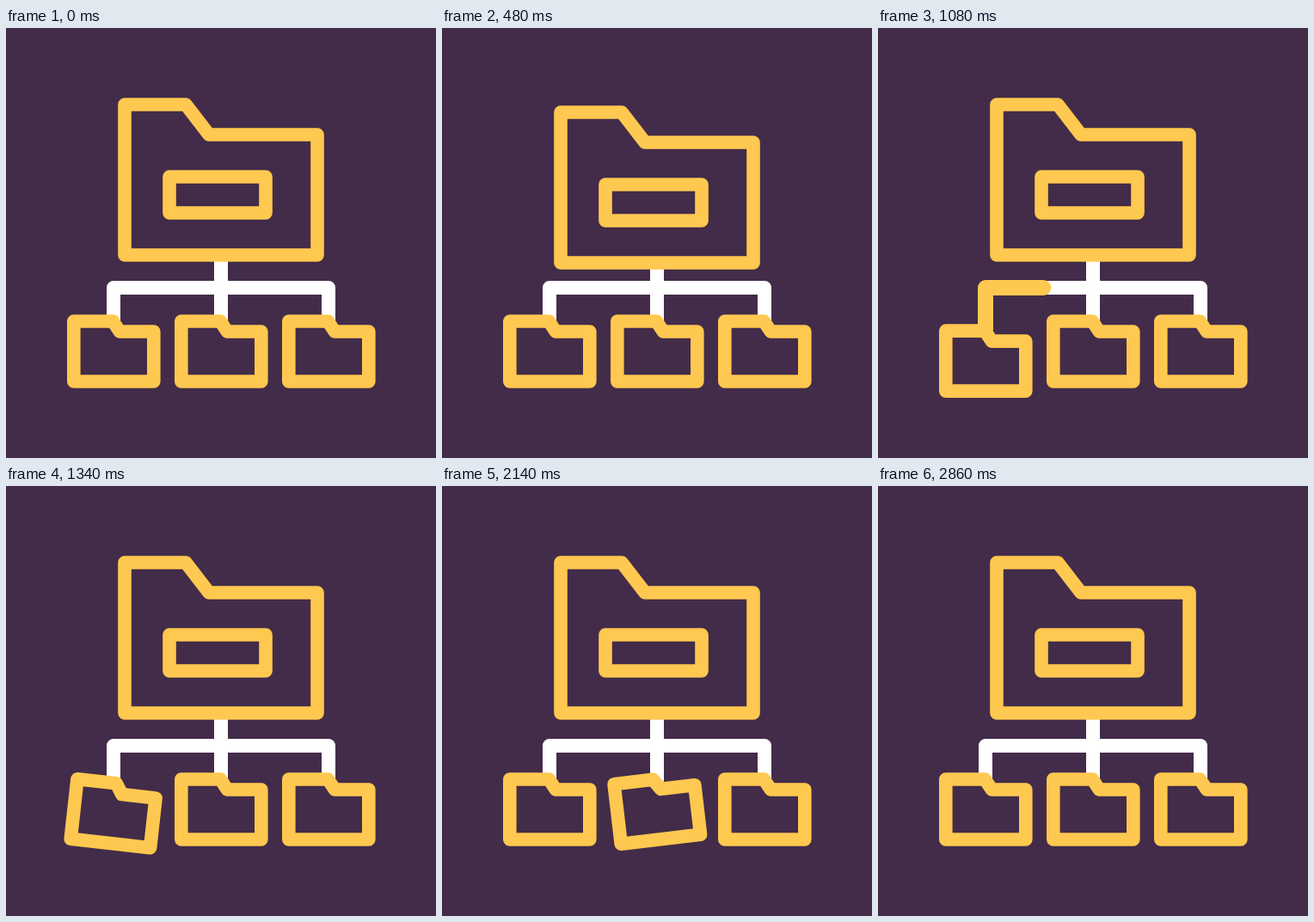
An HTML page with a canvas that plays this animation: 500x500 px, repeating every 3 s.

```html
<!DOCTYPE html>
<html lang="en">
<head>
<meta charset="utf-8">
<title>Folder sorting</title>
<style>
html, body { margin: 0; width: 100%; height: 100%; overflow: hidden; background: #432c49; }
canvas { display: block; width: 100vmin; height: 100vmin; }
</style>
</head>
<body>
<canvas id="stage"></canvas>
<script>
const LOOP = 3000, SIZE = 500, GAP = 592;
const BG = '#432c49', GOLD = '#ffc850', WHITE = '#fff';
const canvas = document.getElementById('stage');
const ctx = canvas.getContext('2d');

const MAIN = [[138, 89], [209, 89], [236, 124], [362, 124], [362, 264], [138, 264]];
const LABEL = [[190, 173], [302, 173], [302, 215], [190, 215]];
const SMALL = [[-46.5, -35], [-1, -35], [7, -23], [46.5, -23], [46.5, 35], [-46.5, 35]];
const TEXT = [[[225, 51], [286, 58]], [[236, 20], [298, 28]], [[230, -12], [292, -4]]];
const BRANCHES = [
  { x: 125, start: 0 },
  { x: 250, start: GAP },
  { x: 375, start: 2 * GAP }
];

const part = (t, a, b) => Math.min(1, Math.max(0, (t - a) / (b - a)));
const smooth = u => (1 - Math.cos(Math.PI * u)) / 2;
const easeOut = u => Math.sin(u * Math.PI / 2);

function trace(points, closed) {
  ctx.beginPath();
  points.forEach(([x, y]) => ctx.lineTo(x, y));
  if (closed) ctx.closePath();
}

function stroke(color, width) {
  ctx.strokeStyle = color;
  ctx.lineWidth = width;
  ctx.stroke();
}

function shape(points) {
  trace(points, true);
  ctx.fillStyle = BG;
  ctx.fill();
  stroke(GOLD, 15.6);
}

function line(points, color, width) {
  trace(points, false);
  stroke(color, width);
}

// The piece of a polyline between two distances along it.
function slice(points, from, to) {
  const out = [];
  let done = 0;
  for (let i = 1; i < points.length; i++) {
    const [ax, ay] = points[i - 1], [bx, by] = points[i];
    const len = Math.hypot(bx - ax, by - ay);
    const a = Math.max(0, from - done), b = Math.min(len, to - done);
    if (len && a < b) {
      for (const d of [a, b]) out.push([ax + (bx - ax) * d / len, ay + (by - ay) * d / len]);
    }
    done += len;
  }
  return out;
}

function paper(t, bottom) {
  if (t < 80 || t > 600) return;
  const u = (t - 80) / 220;
  ctx.save();
  ctx.beginPath();
  ctx.rect(0, 0, SIZE, bottom);
  ctx.clip();
  ctx.translate(0, 108 * (u * u - 1));
  ctx.beginPath();
  ctx.moveTo(181, 82);
  ctx.bezierCurveTo(190, 60, 204, 35, 203, 5);
  ctx.bezierCurveTo(202, -28, 187, -45, 200, -80);
  ctx.lineTo(334, -63);
  ctx.bezierCurveTo(321, -28, 336, -11, 336, 22);
  ctx.bezierCurveTo(337, 52, 323, 77, 314, 99);
  ctx.closePath();
  ctx.fillStyle = BG;
  ctx.fill();
  stroke(GOLD, 15.6);
  TEXT.forEach(p => line(p, WHITE, 16));
  ctx.restore();
}

function pulse({ x, start }, time) {
  const t = time - start;
  const path = [[250, 264], [250, 302], [x, 302], [x, 350]];
  const total = 86 + Math.abs(x - 250);
  const head = part(t, 957, 1045) * total;
  const tail = part(t, 1042, 1128) * total;
  if (head > tail) line(slice(path, tail, head), GOLD, 18);
}

function smallFolder({ x, start }, time) {
  const t = time - start;
  const drop = 28 * (easeOut(part(t, 1046, 1180)) - smooth(part(t, 1180, 1400)));
  const tilt = 7 * smooth(part(t, 1220, 1370))
    - 14 * smooth(part(t, 1370, 1530))
    + 7 * smooth(part(t, 1530, 1670));
  ctx.save();
  ctx.translate(x + 0.3, 376 + drop);
  ctx.rotate(tilt * Math.PI / 180);
  shape(SMALL);
  ctx.restore();
}

function draw(t) {
  const scale = canvas.width / SIZE;
  ctx.setTransform(scale, 0, 0, scale, 0, 0);
  ctx.lineCap = ctx.lineJoin = 'round';
  ctx.fillStyle = BG;
  ctx.fillRect(0, 0, SIZE, SIZE);

  line([[125, 342], [125, 302], [375, 302], [375, 342]], WHITE, 16);
  line([[250, 264], [250, 342]], WHITE, 16);
  BRANCHES.forEach(b => pulse(b, t));

  const push = t < 600
    ? 23 * easeOut(part(t, 440, 600))
    : 23 * Math.pow(1 - part(t, 600, 900), 1.4);
  paper(t, 264 + push);
  ctx.save();
  ctx.translate(0, push);
  shape(MAIN);
  shape(LABEL);
  ctx.restore();

  BRANCHES.forEach(b => smallFolder(b, t));
}

function resize() {
  const side = Math.min(innerWidth, innerHeight) || SIZE;
  canvas.width = canvas.height = Math.round(side * (devicePixelRatio || 1));
}

const begin = performance.now();
function tick() {
  draw((performance.now() - begin) % LOOP);
  requestAnimationFrame(tick);
}

addEventListener('resize', resize);
resize();
tick();
</script>
</body>
</html>
```
